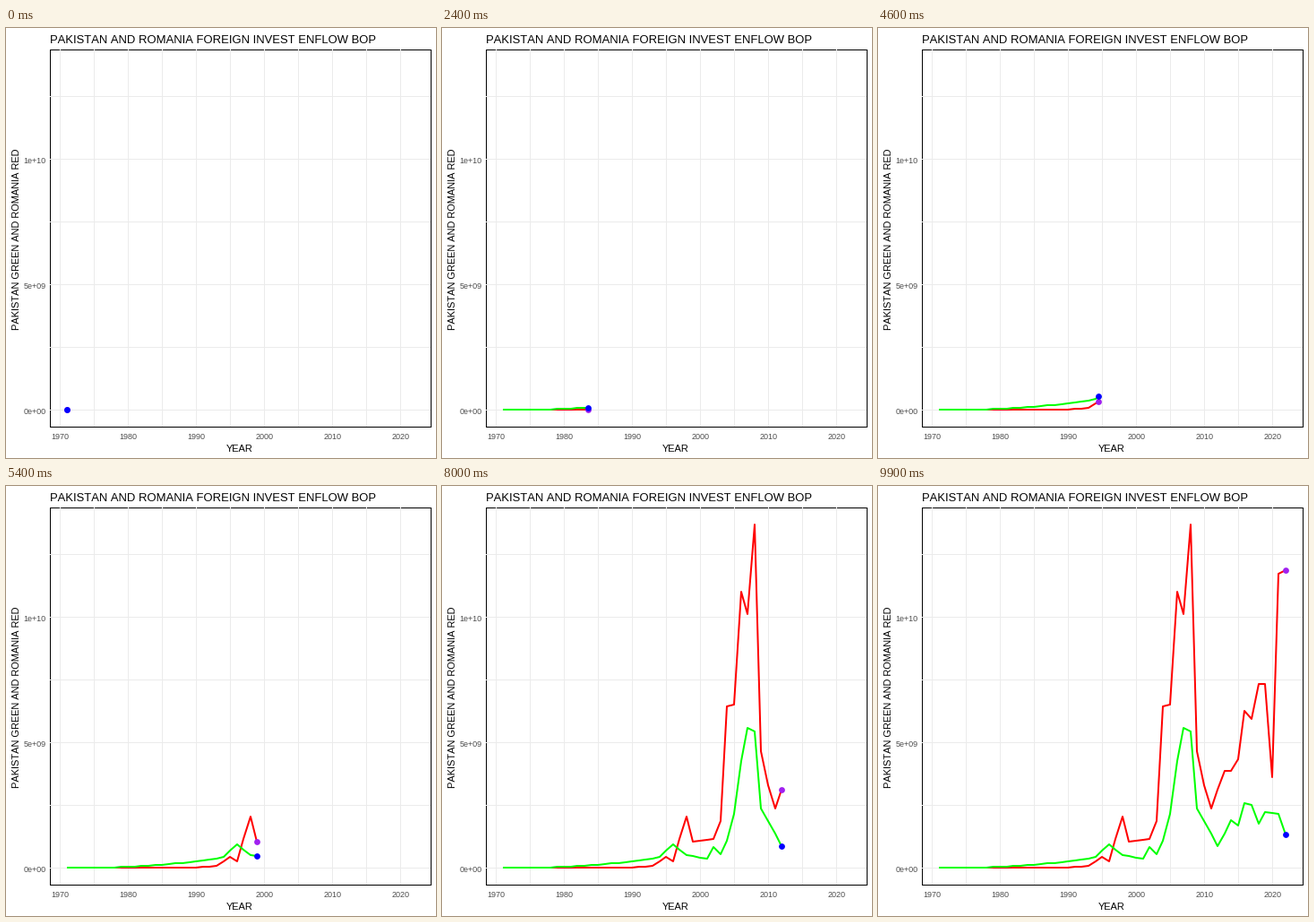
These frames come from a looping animation (480 px wide and 480 px high, 10000 ms). A matplotlib script:

```python
import numpy as np
import matplotlib.pyplot as plt
from matplotlib.animation import FuncAnimation
from matplotlib.patches import Circle, Rectangle

FRAMES, INTERVAL = 100, 100
SIZE, DPI = 480, 96
PX = 72 / DPI  # points per pixel
FIRST, LAST = 1971, 2022
LEFT, RIGHT, TOP, BOTTOM = 49, 474, 24, 445
GRID, TICK = "#EBEBEB", "#4D4D4D"

plt.rcParams["font.family"] = "Liberation Sans"
plt.rcParams["text.kerning_factor"] = 6  # plain advance widths

years = np.arange(FIRST, LAST + 1)
# Each year is reached on a whole frame
keys = np.round((FRAMES - 1) * (years - FIRST) / (LAST - FIRST))


def trend(start, stop, rule):
    return {y: rule(y - start) for y in range(start, stop + 1)}


def yearly(corners):
    return np.interp(years, list(corners), list(corners.values()))


# Inflows in billions: smooth trends joined by the corners of the curve
pakistan = yearly({
    **trend(FIRST, 1994, lambda n: 0.42 * (n / 23) ** 2.5),
    1996: 0.92, 1998: 0.52, 2001: 0.35, 2002: 0.82,
    **trend(2003, 2006, lambda n: 0.534 * 2 ** n),
    2007: 5.59, 2008: 5.44, 2009: 2.36, 2012: 0.86, 2014: 1.89, 2015: 1.67,
    2016: 2.58, 2017: 2.5, 2018: 1.74, 2019: 2.23, 2021: 2.15, 2022: 1.34})
romania = yearly({
    1990: 0, 1993: 0.09, 1995: 0.42, 1996: 0.26, 1998: 2.03, 1999: 1.04,
    2002: 1.15, 2003: 1.86, 2004: 6.44, 2005: 6.5, 2006: 11, 2007: 10.1,
    2008: 13.67, **trend(2009, 2011, lambda n: 4.66 * 0.71 ** n),
    2013: 3.87, 2014: 3.87, 2015: 4.32, 2016: 6.25, 2017: 5.95, 2018: 7.34,
    2019: 7.34, 2020: 3.62, 2021: 11.73, 2022: 11.88})


def to_x(year):
    return np.floor(68 + 387 * (year - FIRST) / (LAST - FIRST) + 0.5)


def to_y(value):
    return np.floor(426.2 - 28 * value + 0.5)


fig = plt.figure(figsize=(SIZE / DPI, SIZE / DPI), dpi=DPI, facecolor="white")
ax = fig.add_axes([0, 0, 1, 1])
ax.set_xlim(0, SIZE)
ax.set_ylim(SIZE, 0)
ax.axis("off")


def box(x, y, w, h, color):
    ax.add_patch(Rectangle((x, y), w, h, fc=color, lw=0, antialiased=False))


def label(x, y, text, size, color="black", ha="center", rotation=0):
    ax.text(x, y, text, fontsize=size * PX, color=color, ha=ha,
            va="baseline", rotation=rotation, rotation_mode="anchor")


def make_line(color):
    return ax.plot([], [], color=color, lw=2 * PX, solid_capstyle="butt",
                   solid_joinstyle="round", snap=False, zorder=3)[0]


def make_dot(color):
    return ax.add_patch(Circle((0, 0), 3.4, fc=color, lw=0, zorder=4))


# Panel frame, with the grid running over its top and left edges
box(LEFT, TOP, RIGHT - LEFT + 1, BOTTOM - TOP + 1, "black")
box(LEFT + 1, TOP + 1, RIGHT - LEFT - 1, BOTTOM - TOP - 1, "white")
for value in np.arange(0, 12.6, 2.5):
    box(LEFT, to_y(value), RIGHT - LEFT, 1, GRID)
for year in range(1970, 2021, 5):
    box(to_x(year), TOP, 1, BOTTOM - TOP, GRID)

for year in range(1970, 2021, 10):
    label(to_x(year) + 0.5, 459, str(year), 9, TICK)
for value in (0, 5, 10):
    label(44.5, to_y(value) + 5, f"{value * 1e9:.0e}", 9, TICK, ha="right")
label(49, 17, "PAKISTAN AND ROMANIA FOREIGN INVEST ENFLOW BOP", 13, ha="left")
label(261, 473, "YEAR", 11)
label(15.5, 236, "PAKISTAN GREEN AND ROMANIA RED", 11, rotation=90)

series = [(romania, make_line("red"), make_dot("#A020F0")),
          (pakistan, make_line("#00FF00"), make_dot("blue"))]


def update(i):
    passed = keys < i
    now = np.interp(i, keys, years)
    xs = to_x(np.append(years[passed], now))
    for values, line, dot in series:
        ys = to_y(np.append(values[passed], np.interp(i, keys, values)))
        line.set_data(xs, ys)
        dot.center = (xs[-1] + 0.5, ys[-1] + 0.5)
    return [artist for _, *pair in series for artist in pair]


anim = FuncAnimation(fig, update, frames=FRAMES, interval=INTERVAL,
                     init_func=lambda: update(0), repeat=True, repeat_delay=0)
plt.show()
```
